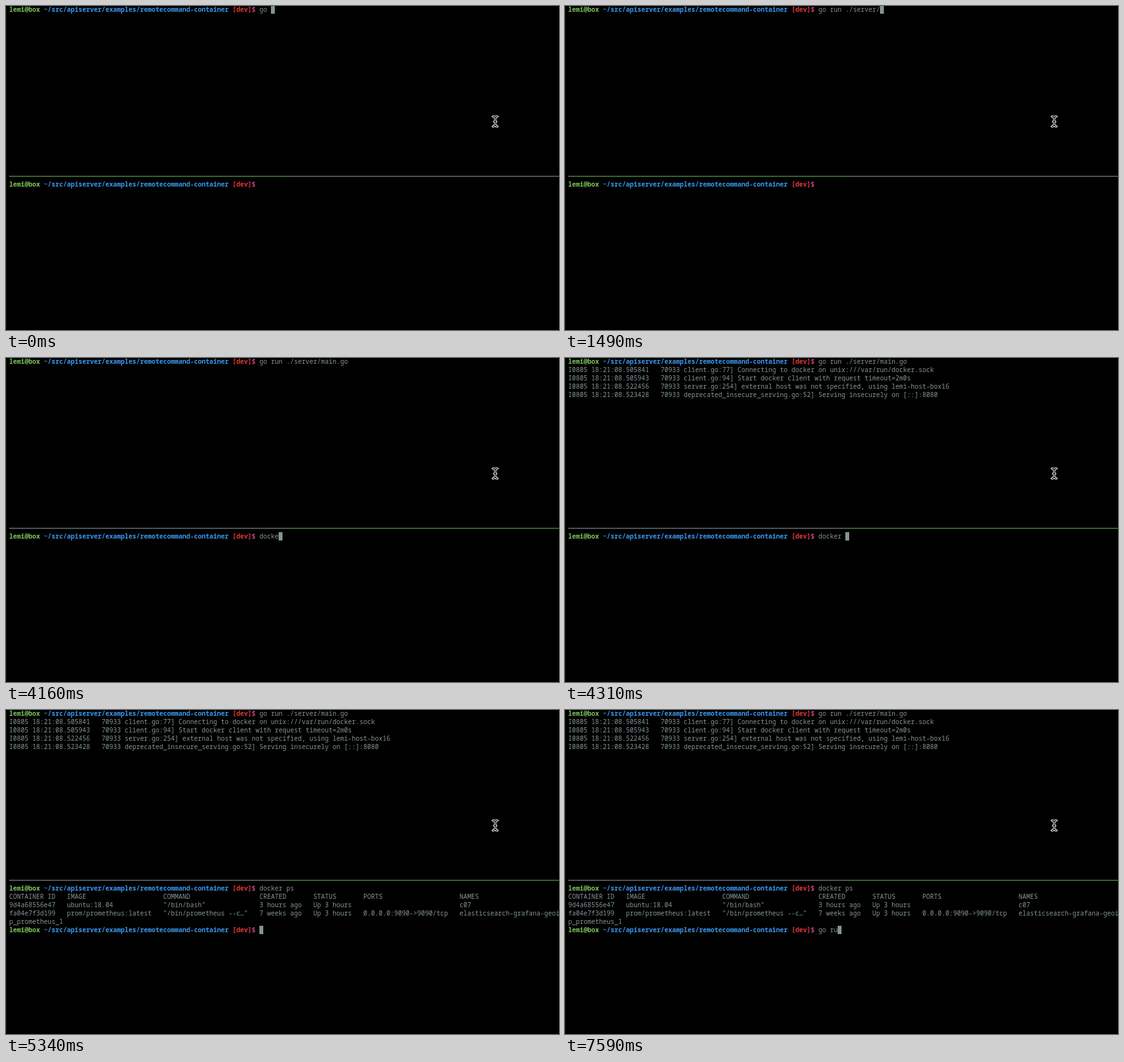
An HTML page for the animation above (8 s loop, 862 px wide and 506 px high).

```html
<!DOCTYPE html>
<html lang="en">
<head>
<meta charset="utf-8">
<title>Terminal session</title>
<style>
  html, body { margin: 0; width: 100%; height: 100%; overflow: hidden; background: #000; }
  svg { display: block; width: 862px; height: 506px; }
  text {
    font: 10px "Noto Sans Mono", "Liberation Mono", monospace;
    fill: #839496;
    white-space: pre;
    font-variant-ligatures: none;
  }
  .bold { font-weight: 700; }
  .user { fill: #7fc45c; }
  .path { fill: #3b98ee; }
  .branch { fill: #e5393b; }
  .sign { fill: #d6438a; }
</style>
</head>
<body>
<svg viewBox="0 0 862 506" xmlns="http://www.w3.org/2000/svg">
  <rect width="862" height="506"/>
  <rect width="1" height="506" fill="#121212"/>
  <g id="screen"></g>
  <rect id="dividerLeft" x="5" y="265.3" width="429" height="1.4"/>
  <rect id="dividerRight" x="434" y="265.3" width="428" height="1.4"/>
  <rect id="cursor" width="6" height="13" fill="#839496"/>
  <g fill="none" stroke-linecap="round" stroke-linejoin="round">
    <path id="beam" stroke="#fff" stroke-width="3.2"
      d="M759 172.5Q762.5 172.5 762.5 176V184.5Q762.5 188 759 188M766 172.5Q762.5 172.5 762.5 176M762.5 184.5Q762.5 188 766 188M761 180.5H764"/>
    <use href="#beam"/>
    <path id="beamCore" stroke="#000" stroke-width="1.3"/>
  </g>
</svg>
<script>
const LOOP = 8000, LEFT = 5, CHAR = 6, LINE = 13, PROMPT_COLS = 65;
const BOTTOM_ROW = 21, LAST_ROW = 26;
const ACTIVE = "#4f8f3d", INACTIVE = "#6c7878";
const SVG_NS = "http://www.w3.org/2000/svg";
const $ = id => document.getElementById(id);
const rowTop = row => row * LINE - 1;

$("beamCore").setAttribute("d", $("beam").getAttribute("d"));

// Each entry: time in ms, text after the prompt.
const serverTyping = [
  [0, "go "], [140, "go r"], [290, "go ru"], [440, "go run "],
  [740, "go run ."], [890, "go run ./"],
  [1190, "go run ./s"], [1340, "go run ./se"], [1490, "go run ./server/"],
  [1940, "go run ./server/main.go "]
];
const dockerTyping = [
  [0, ""], [3730, "d"], [3880, "do"], [4020, "dock"], [4160, "docke"],
  [4310, "docker "], [4600, "docker p"], [4750, "docker ps"]
];
const nextTyping = [[0, ""], [7140, "g"], [7290, "go"], [7440, "go "], [7590, "go ru"]];

const serverLog = [
  "505841   70933 client.go:77] Connecting to docker on unix:///var/run/docker.sock",
  "505943   70933 client.go:94] Start docker client with request timeout=2m0s",
  "522456   70933 server.go:254] external host was not specified, using lemi-host-box16",
  "523428   70933 deprecated_insecure_serving.go:52] Serving insecurely on [::]:8080"
].map(line => "I0805 18:21:08." + line);

const widths = [15, 25, 25, 14, 13, 25, 0];
const tableRow = (...cells) => cells.map((cell, i) => cell.padEnd(widths[i])).join("");
const containers = [
  tableRow("CONTAINER ID", "IMAGE", "COMMAND", "CREATED", "STATUS", "PORTS", "NAMES"),
  tableRow("9d4a68556e47", "ubuntu:18.04", '"/bin/bash"', "3 hours ago", "Up 3 hours", "", "c07"),
  tableRow("fa04e7f3d199", "prom/prometheus:latest", '"/bin/prometheus --c…"', "7 weeks ago",
    "Up 3 hours", "0.0.0.0:9090->9090/tcp", "elasticsearch-grafana-geoi"),
  "p_prometheus_1"
];

function addText(row, content, col = 0, className = "") {
  const node = document.createElementNS(SVG_NS, "text");
  node.setAttribute("x", LEFT + col * CHAR);
  node.setAttribute("y", rowTop(row) + 10);
  node.setAttribute("class", className);
  node.textContent = content;
  return $("screen").appendChild(node);
}

function addPrompt(row) {
  const parts = [
    addText(row, "lemi@box", 0, "bold user"),
    addText(row, "~/src/apiserver/examples/remotecommand-container", 9, "bold path"),
    addText(row, "[dev]", 58, "bold branch"),
    addText(row, "$", 63, "bold sign")
  ];
  return { parts, command: addText(row, "", PROMPT_COLS) };
}

const server = addPrompt(0);
const logLines = serverLog.map((line, i) => addText(1 + i, line));
const docker = addPrompt(BOTTOM_ROW);
const tableLines = containers.map((line, i) => addText(BOTTOM_ROW + 1 + i, line));
const next = addPrompt(LAST_ROW);

const typedAt = (steps, t) => steps.filter(([start]) => start <= t).pop()[1];
const show = (nodes, on) =>
  nodes.forEach(node => node.setAttribute("visibility", on ? "visible" : "hidden"));

function cursorCell(t, commands) {
  const afterText = text => PROMPT_COLS + text.length;
  if (t < 2230) return [0, afterText(commands[0])];
  if (t < 2980) return [1, 0];
  if (t < 4890) return [BOTTOM_ROW, afterText(commands[1])];
  if (t < 5190) return [BOTTOM_ROW + 1, 0];
  if (t < 5340) return [LAST_ROW, 0];
  return [LAST_ROW, afterText(commands[2])];
}

function render(t) {
  const commands = [serverTyping, dockerTyping, nextTyping].map(steps => typedAt(steps, t));
  [server, docker, next].forEach((prompt, i) => { prompt.command.textContent = commands[i]; });
  show(logLines, t >= 4310);
  show(tableLines, t >= 5190);
  show(next.parts, t >= 5340);

  const topActive = t < 2980;
  $("dividerLeft").setAttribute("fill", topActive ? ACTIVE : INACTIVE);
  $("dividerRight").setAttribute("fill", topActive ? INACTIVE : ACTIVE);

  const [row, col] = cursorCell(t, commands);
  $("cursor").setAttribute("x", LEFT + col * CHAR);
  $("cursor").setAttribute("y", rowTop(row));
}

const start = performance.now();
function tick() {
  render((performance.now() - start) % LOOP);
  requestAnimationFrame(tick);
}
tick();
</script>
</body>
</html>
```
